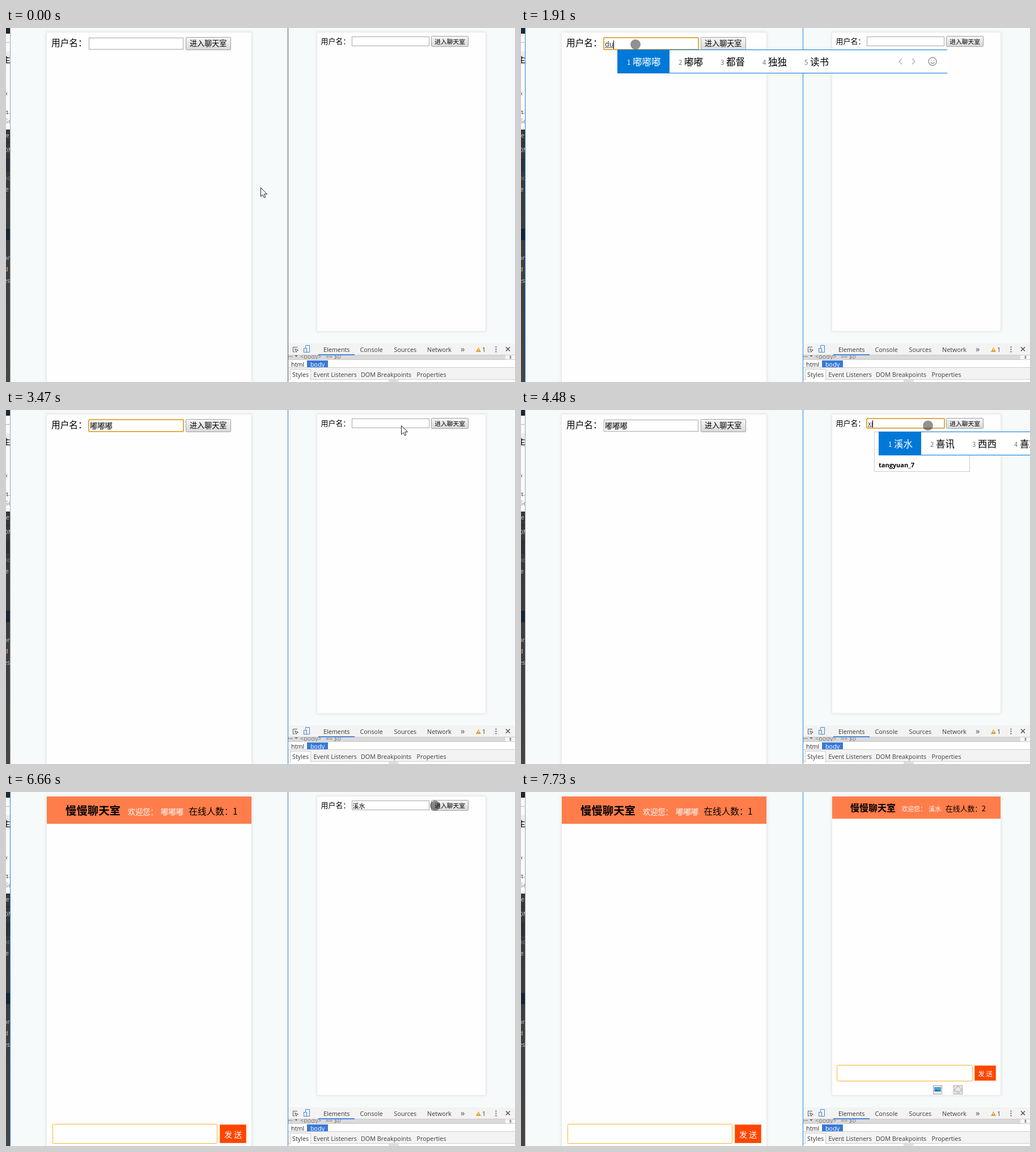
Animation of 898x624 px, one loop 8 s. Source, as an HTML page:

```html
<!DOCTYPE html>
<html lang="zh">
<head>
<meta charset="utf-8">
<title>Chat room login</title>
<style>
html, body { margin: 0; width: 100%; height: 100%; overflow: hidden; background: #f6fafb; }
svg { display: block; width: 898px; height: 624px; }
text { font-family: "Noto Sans CJK SC", "Noto Sans CJK", sans-serif; white-space: pre; }
.ui { font-family: "Open Sans", "Noto Sans", sans-serif; font-size: 10.8px; }
.card { filter: drop-shadow(0 0 3px rgba(0,0,0,.12)); }
</style>
</head>
<body>
<svg id="stage" viewBox="0 0 898 624" xmlns="http://www.w3.org/2000/svg">
  <defs>
    <linearGradient id="btn" x1="0" y1="0" x2="0" y2="1">
      <stop offset="0" stop-color="#f6f6f6"/><stop offset="1" stop-color="#d9d9d9"/>
    </linearGradient>
    <linearGradient id="editor" x1="0" y1="0" x2="0" y2="1">
      <stop offset="0" stop-color="#35373a"/><stop offset="1" stop-color="#454545"/>
    </linearGradient>
    <clipPath id="strip"><rect width="7" height="624"/></clipPath>
    <clipPath id="treeRow"><rect x="498" y="577" width="400" height="7"/></clipPath>
  </defs>
</svg>
<script>
const LOOP = 8000;
const stage = document.getElementById('stage');
const timed = [];
const USER_A = '嘟嘟嘟', USER_B = '溪水', ROOM = '慢慢聊天室';

function add(parent, tag, attrs, content) {
  const el = document.createElementNS(stage.namespaceURI, tag);
  for (const key in attrs) el.setAttribute(key, attrs[key]);
  if (content !== undefined) el.textContent = content;
  return parent.appendChild(el);
}
const group = (parent = stage, attrs = {}) => add(parent, 'g', attrs);
const fill = (p, x, y, width, height, color, more) => add(p, 'rect', { x, y, width, height, fill: color, ...more });
const frame = (p, x, y, w, h, stroke, bg = '#fff', more) => fill(p, x + .5, y + .5, w, h, bg, { stroke, ...more });
const label = (p, x, y, size, str, color = '#000', more) => add(p, 'text', { x, y, 'font-size': size, fill: color, ...more }, str);
const ui = (p, x, y, str, color = '#3c3c3c', more) => add(p, 'text', { x, y, class: 'ui', fill: color, ...more }, str);
const path = (p, d, stroke, more) => add(p, 'path', { d, stroke, fill: 'none', ...more });

// Show an element during [start, end) pairs, in ms
function during(el, ...spans) {
  timed.push({ el, spans });
  return el;
}

function editorStrip() {
  const g = group(stage, { 'clip-path': 'url(#strip)' });
  fill(g, 0, 0, 7, 624, '#fafafa');
  fill(g, 0, 0, 7, 10, '#1c2735');
  fill(g, 0, 41, 7, 24, '#ececec');
  fill(g, 0, 150, 7, 1, '#bbb');
  fill(g, 0, 179, 7, 445, 'url(#editor)');
  fill(g, 0, 202, 7, 1, '#26282c');
  fill(g, 0, 230, 7, 23, '#2b323c');
  fill(g, 0, 354, 7, 20, '#182433');
  ui(g, -1, 28, '--', '#888');
  label(g, -6, 61, 14, '主');
  ui(g, -3, 120, '×', '#333');
  ui(g, -3, 152, 'π', '#333');
  ui(g, -2, 168, 'Se', '#888');
  [['te', 193], ['DM', 219], ['nc', 268, '#888'], ['le', 288], ['on', 409], ['d', 429, '#e0c890'], ['es', 449]]
    .forEach(([s, y, c = '#ccc']) => ui(g, s === 'd' ? -3 : -4, y, s, c));
}

function devTools() {
  const g = group();
  fill(g, 498, 556, 400, 68, '#f3f3f3');
  path(g, 'M514 562.5h-7.500v8.500h3M509.500 565.500l6 2.500-2.500 1-1 2.500z', '#5a5a5a');
  path(g, 'M528.500 563.500v-4h7v12h-5', '#4285d6');
  frame(g, 525, 564, 5, 7, '#4285d6', 'none');
  ui(g, 560, 571, 'Elements', '#333');
  ui(g, 624.5, 571, 'Console');
  ui(g, 684.5, 571, 'Sources');
  ui(g, 743, 571, 'Network');
  ui(g, 802, 571, '»', '#555', { style: 'font-size:15px' });
  path(g, 'M833.500 563l4.500 8h-9z', 'none', { fill: '#e0a030' });
  fill(g, 833, 565.5, 1, 3, '#fff');
  ui(g, 840, 571, '1');
  [562, 566, 570].forEach(y => fill(g, 863.5, y - .5, 2, 2, '#666'));
  path(g, 'M882 562.500l7 7m0-7l-7 7', '#555', { 'stroke-width': 1.6 });
  fill(g, 498, 576, 400, 1, '#ccc');
  fill(g, 551, 575, 64, 2, '#4a86d8');

  const row = group(g, { 'clip-path': 'url(#treeRow)' });
  fill(row, 498, 577, 400, 7, '#dadada');
  ui(row, 498, 582, '•••', '#666', { style: 'font-size:7px' });
  path(row, 'M509.500 577h5l-2.500 3z', 'none', { fill: '#666' });
  ui(row, 519, 583, '<body>', '#777');
  ui(row, 564, 583, '== $0', '#777', { 'font-style': 'italic' });
  fill(row, 881, 577, 17, 7, '#f8f8f8');
  path(row, 'M888 579.500h4l-2-2zm0 1.500h4l-2 2z', 'none', { fill: '#444' });

  fill(g, 498, 584, 400, 15, '#fff');
  fill(g, 498, 584, 400, 1, '#c8c8c8');
  ui(g, 503, 597, 'html', '#222');
  fill(g, 531, 586, 37, 13, '#3879d9');
  ui(g, 537, 597, 'body', '#fff');
  fill(g, 498, 598, 400, 1, '#ccc');
  fill(g, 498, 620, 400, 4, '#fff');
  fill(g, 498, 619, 400, 1, '#d0d0d0');
  frame(g, 501, 601, 36, 19, '#ccc');
  fill(g, 502, 619, 35, 3, '#fff');
  ui(g, 505, 615, 'Styles', '#333');
  ui(g, 542.5, 615, 'Event Listeners');
  ui(g, 626, 615, 'DOM Breakpoints');
  ui(g, 724.5, 615, 'Properties');
  fill(g, 675, 620, 15, 4, '#dedede');
  fill(g, 691, 620, 1, 4, '#bbb');
}

// One browser page; k is its zoom
function page({ x, k, bottom, formY, user, count, chatAt, shift, focus, typed }) {
  const X = v => Math.round(x + v * k), Y = v => Math.round(8 + v * k), S = v => Math.round(v * k);
  const tx = v => x + v * k, ty = v => 8 + v * k;
  fill(stage, x, 8, S(361), bottom - 8, '#fff', { class: 'card' });
  frame(stage, x - 1, 7, S(361) + 1, bottom - 7, '#e9e9ea', '#fefefe');

  const login = during(group(), 0, chatAt);
  label(login, tx(8), ty(24), 15.7 * k, '用户名：');
  const [fx, fy, fw, fh] = [X(74), Y(9), S(165.6), S(20)];
  frame(login, fx, fy, fw, fh, '#a6a6a6');
  during(fill(login, fx, fy, fw + 1, fh + 1, '#fff', { rx: 1, stroke: '#e5aa48', 'stroke-width': 2 }), ...focus);
  frame(login, X(244.6), Y(7.5), S(79), S(22), '#a0a0a0', 'url(#btn)', { rx: 1 });
  label(login, tx(252), ty(24), 13.1 * k, '进入聊天室');
  during(label(login, tx(76), ty(25), 13.3 * k, user), typed, LOOP);

  const chat = during(group(), chatAt, LOOP);
  fill(chat, x, 8, S(361), S(48), '#ff7d4a');
  const nameX = 201 + shift, onlineX = nameX + 13.4 * user.length + 9.3;
  label(chat, tx(33 + shift), ty(32), 19.4 * k, ROOM, '#000', { 'font-weight': 700 });
  label(chat, tx(143 + shift), ty(31.5), 13.2 * k, '欢迎您：', '#fff');
  label(chat, tx(nameX), ty(31.5), 13.4 * k, user, '#fff');
  label(chat, tx(onlineX), ty(31.5), 15.6 * k, '在线人数：');
  label(chat, tx(onlineX + 77.5), ty(31.5), 15.6 * k, count);
  frame(chat, X(10), formY, S(290), S(33.5), '#ffb02e', '#fff', { rx: 1 });
  frame(chat, X(305), formY + 1, S(45.5), S(31.5), '#ff7a2a', '#ff4500');
  label(chat, tx(313), formY + 24 * k, 14 * k, '发 送', '#fff');
  return chat;
}

// Input-method candidate bar
function candidates(x, width, words) {
  const g = group();
  fill(g, x, 38, width, 42, '#fff');
  let left = x;
  words.forEach((word, i) => {
    const w = Math.round(42 + 16.5 * word.length);
    if (!i) fill(g, x, 38, w, 42, '#0078d7');
    label(g, left + 17, 65, 11.5, i + 1, i ? '#777' : '#fff');
    label(g, left + 27, 66, 16.5, word, i ? '#000' : '#fff');
    left += w - 1;
  });
  [38, 79].forEach(y => fill(g, x, y, width, 1, '#0078d7'));
  return g;
}

// Underlined letters being composed, then a caret
function composing(x, y, size, steps, end) {
  steps.forEach(([start, str], i) => {
    const stop = i + 1 < steps.length ? steps[i + 1][0] : end;
    const g = during(group(), start, stop);
    const t = label(g, x, y, size, str, '#222', { style: 'font-family:"Open Sans",sans-serif' });
    const w = t.getComputedTextLength();
    fill(g, x, y + 1, w, 1, '#555');
    fill(g, Math.round(x + w), Math.round(y - size + 1), 1, Math.round(size + 2), '#000');
  });
}

editorStrip();
page({ x: 72, k: 1, bottom: 640, formY: 585, user: USER_A, count: 1, chatAt: 6030, shift: 0,
  focus: [890, 3550], typed: 2330 });
const rightChat = page({ x: 549, k: 297 / 361, bottom: 534, formY: 481, user: USER_B, count: 2, chatAt: 7420, shift: 6,
  focus: [3610, 5940], typed: 4730 });

// Picture and emoji buttons under the message form
[727, 763].forEach(x => frame(rightChat, x, 517, 15, 15, '#a5a5a5', '#eee'));
fill(rightChat, 729, 519, 12, 11, '#fff');
fill(rightChat, 729, 520, 12, 8, '#4aa3d0');
path(rightChat, 'M729 528l4-4 3 3 2-2 3 3z', 'none', { fill: '#2b6f8f' });
add(rightChat, 'circle', { cx: 771, cy: 525, r: 5.5, fill: '#f6f0ee', stroke: '#999' });
path(rightChat, 'M768.500 523.500h1m3 0h1M768.500 527q2.500 2 5 0', '#888');

devTools();

// Window edges, blue while a window is active
const LEFT_ACTIVE = [750, 3470, 5940, 6740];
fill(stage, 7, 0, 1, 624, '#a2a5a8');
during(fill(stage, 7, 0, 1, 624, '#2f86cc'), ...LEFT_ACTIVE);
fill(stage, 497, 0, 1, 624, '#55575a');
during(fill(stage, 497, 0, 1, 624, '#2f86cc'), 750, LOOP);

// Text carets
during(fill(stage, 148, 20, 1, 15, '#000'), 890, 1360);
during(fill(stage, 187, 20, 1, 15, '#000'), 2330, 2770);
during(fill(stage, 611, 17, 1, 13, '#000'), 3610, 4070);
during(fill(stage, 633, 18, 1, 13, '#000'), 4730, 5250, 5770, 5940);

composing(148, 33, 12.5, [[1770, 'd'], [1848, 'du'], [1925, "du'd"], [2003, "du'du"], [2080, "du'du'd"]], 2330);
const barA = candidates(170, 582, [USER_A, '嘟嘟', '都督', '独独', '读书']);
during(barA, 1848, 2330);
path(barA, 'M672 54l-5 5 5 5M690 54l5 5-5 5', '#777');
add(barA, 'circle', { cx: 726, cy: 59, r: 7, fill: 'none', stroke: '#555' });
path(barA, 'M723 57h1m4 0h1M722.500 61q3.500 3 7 0', '#555');

const history = during(group(), 4300, 4560);
frame(history, 623, 38, 168, 70, '#ccc');
ui(history, 631, 101, 'tangyuan_7', '#000', { 'font-weight': 700, style: 'font-size:11px' });
composing(612, 28, 10.8, [[4250, 'x'], [4480, 'xi'], [4560, "xi's"]], 4730);
during(candidates(631, 267, [USER_B, '喜讯', '西西', '喜欢']), 4250, 4730);

// Mouse: press marks and the moving arrow
[[202, 29, 515, 2850], [718, 27.5, 3550, 5400], [358.5, 27, 5800, 6030], [757, 24, 6570, 6800]]
  .forEach(([cx, cy, a, b]) => during(add(stage, 'circle', { cx, cy, r: 9, fill: '#0a0a0c', 'fill-opacity': .45 }), a, b));

const arrow = add(stage, 'path', {
  d: 'M.5 .5v15.500l3.500-3.200 2.600 5.200 2.400-1.200-2.500-5h5z', fill: '#fff', stroke: '#222'
});
// start, end, from x, y, to x, y
const moves = [
  [0, 70, 449, 281, 449, 281],
  [450, 580, 204, 3, 204, 3],
  [2850, 3550, 205, 26, 718, 27],
  [5650, 5800, 712, 27, 362, 27],
  [6100, 6410, 362, 27, 735, 25],
  [6410, 6570, 735, 25, 757, 24],
  [6800, 7340, 757, 24, 821, 34],
  [7340, 7730, 821, 34, 900, 60]
];
const TICK = 78;

function moveArrow(t) {
  const m = moves.find(([a, b]) => t >= a && t < b);
  arrow.style.display = m ? '' : 'none';
  if (!m) return;
  const [a, b, x0, y0, x1, y1] = m;
  const p = Math.min(1, Math.floor((t - a) / TICK) * TICK / Math.max(1, b - a - TICK));
  const e = p * p * (3 - 2 * p);
  arrow.setAttribute('transform', `translate(${Math.round(x0 + (x1 - x0) * e)} ${Math.round(y0 + (y1 - y0) * e)})`);
}

function render(now) {
  const t = now % LOOP;
  for (const { el, spans } of timed) {
    const on = spans.some((s, i) => i % 2 === 0 && t >= s && t < spans[i + 1]);
    el.style.display = on ? '' : 'none';
  }
  moveArrow(t);
}

const began = performance.now();
function tick() {
  render(performance.now() - began);
  requestAnimationFrame(tick);
}
tick();
</script>
</body>
</html>
```
